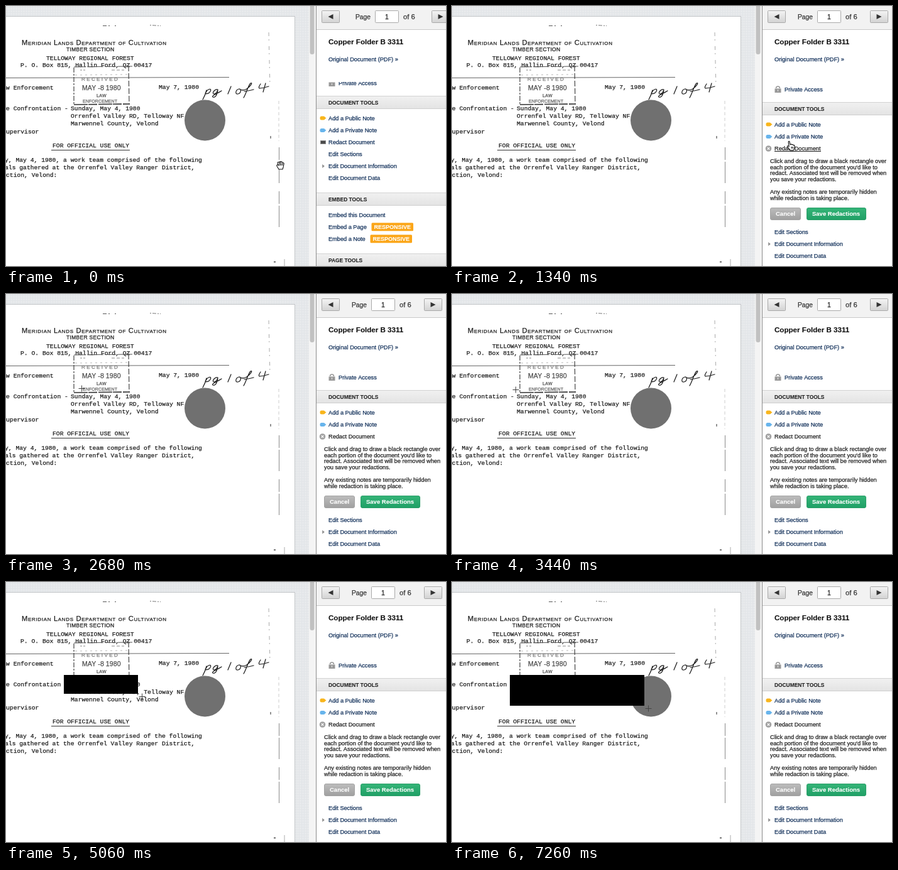
These frames come from a looping animation (700x414 px, 7280 ms). An HTML page with a canvas:

```html
<!DOCTYPE html>
<html lang="en">
<head>
<meta charset="utf-8">
<title>Redacting a document</title>
<style>
html, body { margin: 0; width: 100%; height: 100%; overflow: hidden; background: #fff; }
canvas { display: block; width: 700px; height: 414px; }
</style>
</head>
<body>
<canvas id="stage" width="700" height="414"></canvas>
<script>
const ctx = document.getElementById('stage').getContext('2d');
const LOOP = 7280, OPEN_AT = 1000;
const SANS = '"Liberation Sans", Arial, sans-serif';
const MONO = '"Liberation Mono", "Courier New", monospace';
const LINK = '#12305a', INK = '#1c1c1c';

// A hairline outline gives the text a slightly heavier weight.
function text(str, x, y, size, color = LINK, weight = '', family = SANS, gap = 0) {
  ctx.font = `${weight} ${size}px ${family}`;
  ctx.letterSpacing = gap + 'px';
  ctx.fillStyle = ctx.strokeStyle = color;
  ctx.lineWidth = weight === 'bold' ? .1 : .25;
  ctx.fillText(str, x, y);
  ctx.strokeText(str, x, y);
}
const typed = (str, x, y) => text(str, x, y, 9.7, INK, '', MONO);

function box(x, y, w, h, fill) {
  ctx.fillStyle = fill;
  ctx.fillRect(x, y, w, h);
}

function rounded(x, y, w, h, r, fill, stroke) {
  ctx.beginPath();
  ctx.roundRect(x, y, w, h, r);
  ctx.fillStyle = fill;
  ctx.fill();
  if (stroke) { ctx.strokeStyle = stroke; ctx.lineWidth = 1; ctx.stroke(); }
}

function disc(x, y, r, fill) {
  ctx.beginPath();
  ctx.arc(x, y, r, 0, Math.PI * 2);
  ctx.fillStyle = fill;
  ctx.fill();
}

function shade(y, h, top, bottom) {
  const g = ctx.createLinearGradient(0, y, 0, y + h);
  g.addColorStop(0, top);
  g.addColorStop(1, bottom);
  return g;
}

function line(x1, y1, x2, y2, color, width = 1, dash = []) {
  ctx.setLineDash(dash);
  ctx.strokeStyle = color;
  ctx.lineWidth = width;
  ctx.beginPath();
  ctx.moveTo(x1, y1);
  ctx.lineTo(x2, y2);
  ctx.stroke();
  ctx.setLineDash([]);
}

function triangle(x, y, w, h, color) {
  ctx.beginPath();
  ctx.moveTo(x - w / 2, y - h / 2);
  ctx.lineTo(x + w / 2, y);
  ctx.lineTo(x - w / 2, y + h / 2);
  ctx.fillStyle = color;
  ctx.fill();
}

// Value at time t between [time, x, y] keys, eased in each span.
function along(keys, t) {
  let i = 0;
  while (i < keys.length - 2 && t >= keys[i + 1][0]) i++;
  const [t0, x0, y0] = keys[i], [t1, x1, y1] = keys[i + 1];
  let p = Math.min(1, Math.max(0, (t - t0) / (t1 - t0)));
  p = p * p * (3 - 2 * p);
  return [x0 + (x1 - x0) * p, y0 + (y1 - y0) * p];
}

function backdrop() {
  box(0, 0, 700, 414, '#e8eaec');
  for (let x = 2; x < 482; x += 4) box(x, 0, 1, 414, '#e2e5e8');
  for (let y = 2; y < 414; y += 4) box(0, y, 482, 1, '#e2e5e8');
  box(0, 16, 460, 398, '#c2c5c8');
  box(0, 17, 459, 397, '#fff');
  box(482, 0, 11, 414, '#f4f4f4');
  rounded(483.5, -8, 7, 85, 3.5, '#c1c1c1');
}

function stamp() {
  const grey = '#4c4c4c';
  line(108, 98, 108, 157, '#444', 1.2, [8, 2, 3, 2]);
  line(195, 95, 196, 157, '#444', 1.2, [9, 3]);
  line(108, 157, 197, 156, '#333', 1.6, [22, 1, 14, 2]);
  line(108, 97, 201, 96, '#555', 1, [18, 3, 26, 2]);
  line(118, 102, 128, 102, '#888', 1, [3, 2]);
  line(168, 102, 188, 102, '#888', 1, [5, 3]);
  line(110, 110, 195, 109, '#aaa', .8, [3, 5]);
  text('RECEIVED', 120, 118.5, 8, '#777', '', SANS, 2.4);
  text('MAY -8 1980', 121, 133.5, 10.5, grey, '', SANS, .1);
  text('LAW', 144, 144.5, 7, grey, '', SANS, .3);
  text('ENFORCEMENT', 122, 154, 7, '#666', '', SANS, .1);
}

function handwriting() {
  ctx.strokeStyle = '#1c1c1c';
  ctx.lineWidth = 1.25;
  ctx.lineCap = ctx.lineJoin = 'round';
  ctx.stroke(new Path2D(
    'M319 134 Q317 142 313 149 M318 138 C321 131 328 131 325 136 C323 140 318 140 317 139' +
    'M337 133 C331 132 327 140 331 140 C334 140 337 135 337 133 C337 140 333 147 329 145 C326 143 337 139 343 135' +
    'M358 128 L353 140' +
    'M371 132 C365 133 364 141 369 140 C374 139 375 132 371 132 Q377 136 383 132' +
    'C390 127 393 121 389 123 C385 127 382 140 378 146 M379 136 Q387 135 394 133' +
    'M405 124 Q401 130 403 131 Q408 131 418 128 M413 123 L409 137'));
  ctx.lineCap = 'butt';
}

function paper() {
  line(154, 31.5, 175, 31.5, '#555', 1, [6, 3, 2, 8]);
  line(229, 30.5, 246, 31.5, '#777', 1, [2, 2, 6, 2]);
  text('Meridian Lands Department of Cultivation', 25, 62, 11.2, INK, 'small-caps', SANS, .67);
  text('TIMBER SECTION', 96, 71.5, 8.5, INK, '', SANS, .3);
  typed('TELLOWAY REGIONAL FOREST', 64, 86);
  typed('P. O. Box 815, Hallin Ford, QZ 00417', 23, 97);
  line(0, 114.5, 355, 113.5, '#666', 1);
  typed('w Enforcement', 0, 133);
  typed('May 7, 1980', 243, 131.5);
  typed('e Confrontation - ', 0, 166);
  typed('Sunday, May 4, 1980', 103, 166);
  typed('Orrenfel Valley RD, Telloway NF', 103, 178);
  typed('Marwennel County, Velond', 103, 190);
  typed('upervisor', 0, 203);
  typed('FOR OFFICIAL USE ONLY', 74, 225);
  line(72, 229.5, 197, 229.5, '#333');
  typed('y, May 4, 1980, a work team comprised of the following', -2, 248);
  typed('als gathered at the Orrenfel Valley Ranger District,', -2, 260);
  typed('ction, Velond:', 0, 272);
  stamp();
  handwriting();
  disc(316.5, 182, 32.5, '#707070');
  line(418, 42, 420, 130, '#aaa', 1, [6, 5, 2, 9]);
  line(421, 207, 421, 211, '#666', 1.4);
  line(434, 151, 434, 215, '#ccc', 1, [5, 4]);
  line(434.5, 225, 434.5, 356, '#8a8a8a', 1, [20, 3, 34, 13]);
  line(426, 407.5, 429, 407.5, '#444', 1.5);
  line(443, 403, 443, 414, '#aaa');
}

function toolButton(x, dir) {
  rounded(x + .5, 7.5, 28, 19, 1, shade(7, 20, '#f5f5f5', '#d2d2d2'), '#a9a9a9');
  ctx.save();
  ctx.translate(x + 14.5, 17);
  ctx.scale(dir, 1);
  triangle(0, 0, 8, 8, '#333');
  ctx.restore();
}

function toolbar(open) {
  const dx = open ? -6 : 0;
  box(493, 0, 207, 414, '#fff');
  box(494, 0, 206, 37, '#f2f2f2');
  box(494, 37, 206, 1, '#c9c9c9');
  toolButton(502, -1);
  toolButton(open ? 665 : 677, 1);
  text('Page', 556 + dx, 21, 10.2, '#333');
  rounded(587.5 + dx, 7.5, 37, 19, 1, '#fff', '#aaa');
  text('1', 603 + dx, 21, 10.4, '#222');
  text('of 6', 632 + dx, 21, 11.2, '#333');
  text('Copper Folder B 3311', 513, 60.7, 11.6, '#111', 'bold');
  text('Original Document (PDF) »', 513, 88, 9.2);
}

function band(label, y) {
  box(494, y, 206, 21, shade(y, 21, '#f1f1f1', '#e3e3e3'));
  box(494, y, 206, 1, '#d2d2d2');
  box(494, y + 20, 206, 1, '#cfcfcf');
  text(label, 513, y + 13.5, 8.4, '#222', 'bold');
}

function access(y) {
  ctx.save();
  ctx.beginPath();
  ctx.rect(494, 121, 206, 25);
  ctx.clip();
  ctx.strokeStyle = '#999';
  ctx.lineWidth = 1.6;
  ctx.beginPath();
  ctx.arc(518.5, y - 5, 3, Math.PI, 0);
  ctx.stroke();
  box(513.5, y - 4.5, 10, 6.5, '#999');
  box(518, y - 3, 1, 3, '#e8e8e8');
  text('Private Access', 529, y, 9.2);
  ctx.restore();
}

function note(y, color) {
  rounded(499.5, y - 3, 8, 6, 2.5, color);
  triangle(507.8, y, 3.5, 5, color);
}

function responsive(x, y) {
  rounded(x, y - 6.5, 66.5, 13, 1.5, '#fba619');
  text('RESPONSIVE', x + 4, y + 3.2, 9, '#fff', 'bold');
}

function editLinks(y) {
  ['Edit Sections', 'Edit Document Information', 'Edit Document Data']
    .forEach((s, i) => text(s, 513, y + i * 19.2, 9.2));
  triangle(505, y + 16, 3.5, 6, '#8b8b8b');
}

function redactLink(y, color, hover) {
  text('Redact Document', 513, y, 9.2, color);
  if (hover) box(513, Math.round(y + 1), 74, 1, color);
}

function pushButton(label, x, w, top, bottom, edge) {
  rounded(x + .5, 321.5, w - 1, 19, 2.5, shade(321, 20, top, bottom), edge);
  text(label, x + 9, 334.3, 9.5, '#fff', 'bold');
}

function panel(open, hover) {
  const dy = open ? 10 : 0;
  toolbar(open);
  access(126 + dy);
  band('DOCUMENT TOOLS', 143 + dy);
  note(178.5 + dy, '#f8b51c');
  text('Add a Public Note', 513, 181.5 + dy, 9.2);
  note(198 + dy, '#67b4ec');
  text('Add a Private Note', 513, 201 + dy, 9.2);
  if (open) {
    disc(503.5, 227, 4.8, '#a2a2a2');
    line(501.7, 225.2, 505.3, 228.8, '#fff', 1.2);
    line(505.3, 225.2, 501.7, 228.8, '#fff', 1.2);
    redactLink(230, '#222', hover);
    ['Click and drag to draw a black rectangle over', 'each portion of the document you\'d like to',
     'redact. Associated text will be removed when', 'you save your redactions.', '',
     'Any existing notes are temporarily hidden', 'while redaction is taking place.']
      .forEach((s, i) => text(s, 506, 249.7 + i * 9.85, 9.25, '#222'));
    pushButton('Cancel', 506, 49, '#bdbdbd', '#9f9f9f', '#a3a3a3');
    pushButton('Save Redactions', 564, 95, '#35b578', '#1f9f65', '#2a9f68');
    editLinks(363);
  } else {
    box(500, 214, 9, 6, '#8a8a8a');
    box(501, 215, 7, 4, '#4a4a4a');
    redactLink(220, LINK, hover);
    editLinks(239);
    band('EMBED TOOLS', 297);
    text('Embed this Document', 513, 335.5, 9.2);
    text('Embed a Page', 513, 355, 9.2);
    responsive(581.5, 351.8);
    text('Embed a Note', 513, 374, 9.2);
    responsive(579.5, 370.8);
    band('PAGE TOOLS', 394);
  }
  box(493, 0, 1, 414, '#8d8d8d');
}

const openHand = new Path2D('M-3 6 L-6 1 C-7 -1 -5 -2 -3 0 L-5 -4 C-5 -6 -3 -6 -2 -4 L-2 -5 C-2 -7 0 -7 0 -5' +
  'C1 -7 3 -6 3 -4 C4 -5 6 -4 5 -2 L4 3 L3 6 Z M-2 -4 L-1 0 M0 -5 L1 0 M3 -4 L3 0');
const pointer = new Path2D('M-1 1 C-1 -1 1 -1 1 1 L2 5 C3 4 4 4 5 5 C6 4 7 5 7 6 C9 5 9 7 9 8 L8 12 L7 14' +
  'L2 14 L-2 9 C-4 7 -2 6 0 8 Z M4 8 L4 11 M6 8 L6 11');

function cursor(shape, x, y) {
  ctx.save();
  ctx.translate(x, y);
  ctx.lineJoin = 'round';
  ctx.fillStyle = '#fff';
  ctx.strokeStyle = '#111';
  ctx.lineWidth = 1.1;
  ctx.fill(shape);
  ctx.stroke(shape);
  ctx.restore();
}

function cross(x, y) {
  x = Math.round(x) + .5;
  y = Math.round(y) + .5;
  line(x - 5, y, x + 5, y, '#444');
  line(x, y - 5, x, y + 5, '#444');
}

const mouse = [[0, 437, 254], [60, 437, 254], [430, 531, 219], [1050, 531, 219],
  [1620, 541, 213], [1700, 540, 212], [2500, 120, 150], [2900, 120, 150], [3600, 98, 152], [4220, 98, 152]];
const drag = [[4220, 0, 0], [4380, 9, 7], [5660, 207, 49], [5900, 214, 49]];

function draw(t) {
  const open = t >= OPEN_AT;
  const hover = t >= 400 && t < 1720;
  backdrop();
  paper();
  panel(open, hover);
  if (t >= 4220) {
    const [w, h] = along(drag, t).map(Math.round);
    box(92, 148, w, h, '#000');
    cross(98 + w, 152 + h);
    return;
  }
  const [x, y] = along(mouse, t);
  if (x > 493) cursor(pointer, x, y);
  else if (!open) cursor(openHand, x, y);
  else cross(x, y);
}

const start = performance.now();
function frame() {
  draw((performance.now() - start) % LOOP);
  requestAnimationFrame(frame);
}
frame();
</script>
</body>
</html>
```
